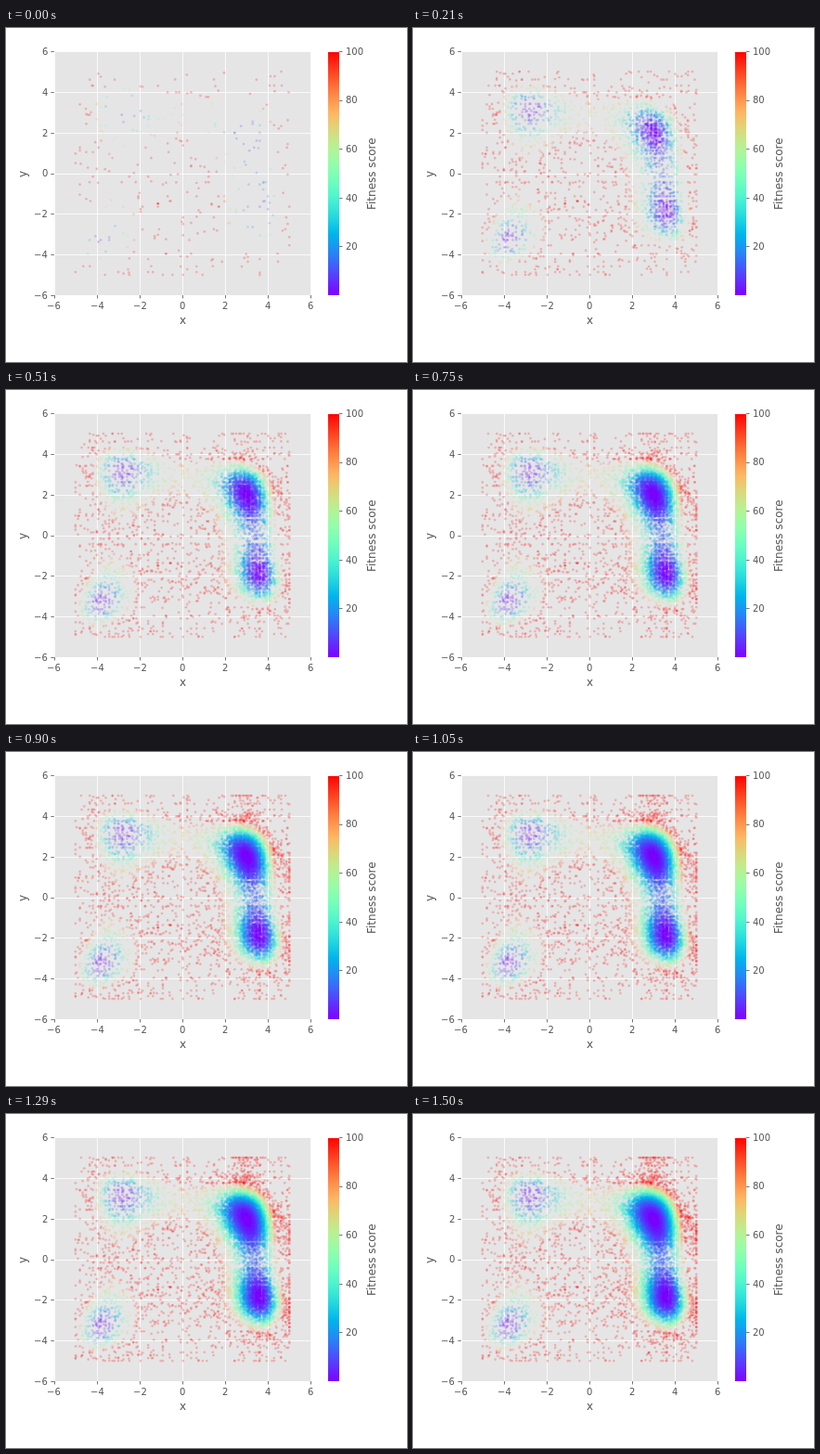
Recreate the animation shown at these times as an HTML page with a canvas. Size 432x360 px, loop 1.53 s.

```html
<!DOCTYPE html>
<html lang="en">
<head>
<meta charset="utf-8">
<title>Fitness landscape search</title>
<style>
  html, body { margin: 0; width: 100%; height: 100%; overflow: hidden; background: #fff; }
  canvas { display: block; width: 432px; height: 360px; }
</style>
</head>
<body>
<canvas id="stage" width="432" height="360"></canvas>
<script>
const ctx = document.getElementById('stage').getContext('2d');
const STEP = 30, GENERATIONS = 51, POPULATION = 320, LIMIT = 5;
const PLOT = { x: 51.84, y: 25.2, w: 276.48, h: 262.8 };
const BAR = { x: 347, y: 26, w: 12 };
const GREY = '#555555';

const px = x => PLOT.x + (x + 6) / 12 * PLOT.w;
const py = y => PLOT.y + (6 - y) / 12 * PLOT.h;
const barY = v => PLOT.y + PLOT.h * (1 - v / 100);
const clamp = (v, lo, hi) => Math.min(hi, Math.max(lo, v));

let seed = 20417;
function random() {
  seed = (seed + 0x6D2B79F5) | 0;
  let t = Math.imul(seed ^ (seed >>> 15), 1 | seed);
  t = (t + Math.imul(t ^ (t >>> 7), 61 | t)) ^ t;
  return ((t ^ (t >>> 14)) >>> 0) / 4294967296;
}
const spread = r => (random() * 2 - 1) * r;
const gauss = () => Math.sqrt(-2 * Math.log(1 - random())) * Math.cos(2 * Math.PI * random());

// Himmelblau's function
const fitness = (x, y) => (x * x + y - 11) ** 2 + (x + y * y - 7) ** 2;

function rainbow(t) {
  const r = Math.min(1, Math.abs(2 * t - 0.5));
  const g = Math.sin(Math.PI * t);
  const b = Math.cos(Math.PI * t / 2);
  return `rgb(${[r, g, b].map(c => Math.round(clamp(c, 0, 1) * 255)).join(',')})`;
}
const palette = Array.from({ length: 101 }, (_, i) => rainbow(i / 100));

// Coordinates are inherited, so points share rows and columns.
const genes = () => Array.from({ length: 170 }, () => spread(LIMIT));
const pools = [genes(), genes()];
const nearest = (pool, v) =>
  pool.reduce((best, g) => Math.abs(g - v) < Math.abs(best - v) ? g : best);

const anywhere = () => [spread(LIMIT + 0.12), spread(LIMIT + 0.12)];

// Anywhere on the map, but fitter places survive more often.
function explore() {
  let point;
  do point = anywhere();
  while (random() > 0.13 + Math.exp(-fitness(...point) / 60));
  return point;
}

// Around one of the two winning optima; some coordinates mutate widely.
function refine() {
  const [cx, cy] = random() < 0.72 ? [3, 2.05] : [3.45, -1.85];
  const reach = () => gauss() * (random() < 0.13 ? 2.4 : 1);
  const dx = reach();
  return [cx + 0.46 * dx, cy + 0.6 * reach() - 0.12 * dx];
}

function makeGeneration(k) {
  const decay = Math.exp(-k / 9);
  const inherit = 0.2 + 0.6 * decay;
  const settle = (v, axis) =>
    clamp(Math.abs(v) < LIMIT && random() < inherit ? nearest(pools[axis], v) : v, -LIMIT, LIMIT);

  return Array.from({ length: POPULATION }, () => {
    const pick = k === 0 ? anywhere : random() < 0.03 + 0.85 * decay ? explore : refine;
    const [x, y] = pick().map(settle);
    return { x: px(x), y: py(y), color: palette[Math.round(Math.min(100, fitness(x, y)))] };
  });
}
const generations = Array.from({ length: GENERATIONS }, (_, k) => makeGeneration(k));

function line(x1, y1, x2, y2, color) {
  ctx.strokeStyle = color;
  ctx.lineWidth = 0.8;
  ctx.beginPath();
  ctx.moveTo(x1, y1);
  ctx.lineTo(x2, y2);
  ctx.stroke();
}

// Text starts on whole pixels; align is the share of its width left of x.
function label(text, x, y, size, align) {
  ctx.font = `${size}px "DejaVu Sans", sans-serif`;
  ctx.fillStyle = GREY;
  ctx.fillText(text, Math.round(x - align * ctx.measureText(text).width), Math.round(y));
}

function uprightLabel(text, x, y) {
  ctx.save();
  ctx.translate(x, Math.round(y));
  ctx.rotate(-Math.PI / 2);
  label(text, 0, 0, 12, 0.5);
  ctx.restore();
}

function drawAxes() {
  const bottom = PLOT.y + PLOT.h, right = PLOT.x + PLOT.w;
  ctx.globalAlpha = 1;
  ctx.fillStyle = '#fff';
  ctx.fillRect(0, 0, 432, 360);
  ctx.fillStyle = '#e5e5e5';
  ctx.fillRect(PLOT.x, PLOT.y, PLOT.w, PLOT.h);

  for (let v = -6; v <= 6; v += 2) {
    const x = Math.round(px(v)) + 0.5, y = Math.round(py(v)) + 0.5;
    const text = String(v).replace('-', '\u2212');
    line(x, PLOT.y, x, bottom, '#fff');
    line(PLOT.x, y, right, y, '#fff');
    line(x, bottom, x, bottom + 3.5, GREY);
    line(PLOT.x - 3.5, y, PLOT.x, y, GREY);
    label(text, px(v), 303, 10, 0.5);
    label(text, 45, py(v) + 3.7, 10, 1);
  }
  label('x', px(0), 319, 12, 0.5);
  uprightLabel('y', 22, py(0));

  const ramp = ctx.createLinearGradient(0, bottom, 0, PLOT.y);
  palette.forEach((color, i) => ramp.addColorStop(i / 100, color));
  ctx.fillStyle = ramp;
  ctx.fillRect(BAR.x, BAR.y, BAR.w, bottom - BAR.y);
  for (let v = 20; v <= 100; v += 20) {
    const y = Math.round(barY(v)) + 0.5;
    line(BAR.x + BAR.w, y, BAR.x + BAR.w + 3.5, y, GREY);
    label(v, 366, barY(v) + 3.7, 10, 0);
  }
  uprightLabel('Fitness score', 398, py(0));
}

function drawPoints(points) {
  ctx.globalAlpha = 0.23;
  for (const p of points) {
    ctx.fillStyle = p.color;
    ctx.beginPath();
    ctx.arc(p.x, p.y, 1.35, 0, 2 * Math.PI);
    ctx.fill();
  }
}

let shown = -1;
function render(now) {
  const current = Math.floor(now / STEP) % GENERATIONS;
  if (shown < 0 || current < shown) {
    drawAxes();
    shown = -1;
  }
  while (shown < current) drawPoints(generations[++shown]);
}

const start = performance.now();
function tick() {
  render(performance.now() - start);
  requestAnimationFrame(tick);
}
tick();
</script>
</body>
</html>
```
